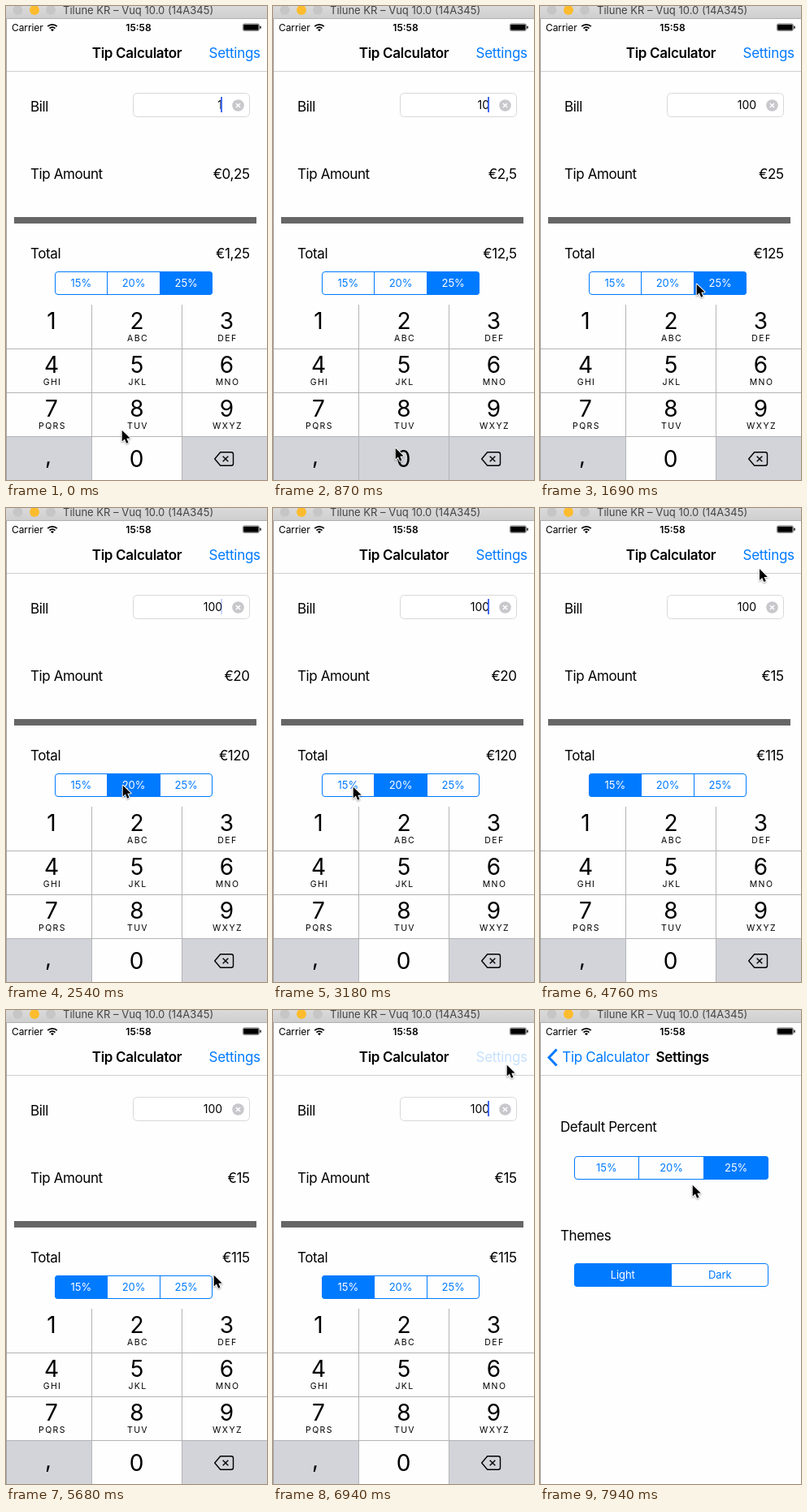
Write an HTML page with a canvas that moves like this. It is 321 by 584 pixels and loops after 8 s.

```html
<!DOCTYPE html>
<html lang="en">
<head>
<meta charset="utf-8">
<title>Tip Calculator</title>
<style>
  html, body { margin: 0; width: 100%; height: 100%; overflow: hidden; background: #fff; }
  canvas { display: block; width: 321px; height: 584px; }
</style>
</head>
<body>
<canvas id="stage" width="321" height="584"></canvas>
<script>
const W = 321, H = 584, LOOP = 8000;
const BLUE = '#007aff', PAPER = '#fefefe', KEY_GRAY = '#d2d4da', LINE = '#b4b4b6';
const FONT = 'Inter, Roboto, sans-serif';
const PUSH_AT = 7395;
const ctx = document.getElementById('stage').getContext('2d');

// Pointer path: time, x, y of the tip
const PATH = [
  [0, 142, 522], [50, 142, 522], [330, 150, 544], [1210, 150, 544],
  [1450, 172, 440], [1690, 192, 342], [1780, 188, 342], [2030, 152, 343],
  [2300, 143, 341], [2600, 143, 341], [2870, 98, 343], [3400, 98, 343],
  [3740, 98, 339], [3890, 158, 260], [4060, 208, 176], [4270, 208, 176],
  [4700, 271, 72], [5120, 241, 150], [5300, 244, 240], [5490, 255, 326],
  [5680, 255, 326], [5800, 250, 210], [5980, 309, 64], [6140, 309, 64],
  [6370, 266, 121], [6570, 287, 67], [7480, 287, 67], [7900, 187, 215], [8000, 187, 215]
];

// Bill, tip and total as they change over time
const STATES = [
  { at: 0, bill: '1', tip: '€0,25', total: '€1,25', pick: 2 },
  { at: 470, bill: '10', tip: '€2,5', total: '€12,5', pick: 2 },
  { at: 980, bill: '100', tip: '€25', total: '€125', pick: 2 },
  { at: 2300, bill: '100', tip: '€20', total: '€120', pick: 1 },
  { at: 3200, bill: '100', tip: '€15', total: '€115', pick: 0 }
];
const PRESSES = [[370, 470], [870, 980]];

const clamp = v => Math.max(0, Math.min(1, v));
const mix = (a, b, p) => a + (b - a) * p;

function slope(i, axis) {
  if (i === 0 || i === PATH.length - 1) return 0;
  const [a, b, c] = [PATH[i - 1], PATH[i], PATH[i + 1]];
  const m = (b[axis] - a[axis]) / (b[0] - a[0]);
  const n = (c[axis] - b[axis]) / (c[0] - b[0]);
  return m * n <= 0 ? 0 : 2 * m * n / (m + n);
}

// Monotone cubic through the path points
function pointer(t) {
  let i = 0;
  while (i < PATH.length - 2 && t >= PATH[i + 1][0]) i++;
  const a = PATH[i], b = PATH[i + 1], span = b[0] - a[0], u = (t - a[0]) / span;
  const ease = u * u * (3 - 2 * u);
  return [1, 2].map(k => mix(a[k], b[k], ease) +
    span * u * (1 - u) * ((1 - u) * slope(i, k) - u * slope(i + 1, k)));
}

function caretAlpha(t) {
  if (t < 1400) return 1;
  const phase = (t - 900) % 1000;
  return phase < 500 ? clamp(phase / 40) : 1 - clamp((phase - 520) / 170);
}

function pushProgress(t) {
  const s = Math.max(0, t - PUSH_AT) / 1000 * 17;
  return 1 - (1 + s) * Math.exp(-s);
}

function text(str, x, y, o = {}) {
  const { size = 17, weight = 400, color = '#000', align = 'left', track = -0.024 * size, alpha = 1 } = o;
  ctx.save();
  ctx.globalAlpha *= alpha;
  ctx.font = `${weight} ${size}px ${FONT}`;
  ctx.letterSpacing = track + 'px';
  ctx.textAlign = align;
  ctx.fillStyle = color;
  // Leave out the spacing after the last letter
  ctx.fillText(str, align === 'right' ? x + track : x, y);
  ctx.restore();
}

function rect(x, y, w, h, color) {
  ctx.fillStyle = color;
  ctx.fillRect(x, y, w, h);
}

function disc(x, y, r, color) {
  ctx.fillStyle = color;
  ctx.beginPath();
  ctx.arc(x, y, r, 0, 7);
  ctx.fill();
}

function stroke(points, color, width) {
  ctx.strokeStyle = color;
  ctx.lineWidth = width;
  ctx.beginPath();
  points.forEach(([x, y], i) => i ? ctx.lineTo(x, y) : ctx.moveTo(x, y));
  ctx.stroke();
}

function cross(x, y, r, color, width) {
  stroke([[x - r, y - r], [x + r, y + r]], color, width);
  stroke([[x + r, y - r], [x - r, y + r]], color, width);
}

function segments(x, y, w, labels, pick) {
  const h = 29, part = w / labels.length;
  const edge = i => Math.floor(x + i * part);
  ctx.save();
  ctx.beginPath();
  ctx.roundRect(x, y, w, h, 4);
  ctx.clip();
  rect(edge(pick), y, edge(pick + 1) + 1 - edge(pick), h, BLUE);
  for (let i = 1; i < labels.length; i++) rect(edge(i), y, 1, h, BLUE);
  ctx.restore();
  ctx.strokeStyle = BLUE;
  ctx.lineWidth = 1;
  ctx.beginPath();
  ctx.roundRect(x + 0.5, y + 0.5, w - 1, h - 1, 3.5);
  ctx.stroke();
  labels.forEach((label, i) => text(label, x + (i + 0.5) * part, y + 19,
    { size: 13, align: 'center', track: -0.1, color: i === pick ? '#fff' : BLUE }));
}

function calculator(t) {
  const s = STATES.filter(state => t >= state.at).pop();
  rect(0, 81, W, H, PAPER);
  text('Bill', 30, 130);
  ctx.beginPath();
  ctx.roundRect(156.5, 107.5, 143, 29, 5);
  ctx.fillStyle = '#fff';
  ctx.fill();
  ctx.strokeStyle = '#d8d8d8';
  ctx.lineWidth = 1;
  ctx.stroke();
  text(s.bill, 266, 127, { size: 14, align: 'right', track: -0.1 });
  ctx.save();
  ctx.globalAlpha *= caretAlpha(t);
  rect(264, 112, 2, 19, '#426bf2');
  ctx.restore();
  disc(285.5, 122.5, 7.3, '#c8c8cc');
  cross(285.5, 122.5, 2.6, '#fff', 1.4);

  text('Tip Amount', 30, 213);
  text(s.tip, 300, 213, { align: 'right' });
  rect(10, 260, 298, 8, '#666');
  text('Total', 30, 311);
  text(s.total, 300, 311, { align: 'right' });
  segments(60, 327, 194, ['15%', '20%', '25%'], s.pick);
}

function keyboard(t) {
  const cols = [56, 161, 271.5];
  const letters = ['', 'ABC', 'DEF', 'GHI', 'JKL', 'MNO', 'PQRS', 'TUV', 'WXYZ'];
  rect(0, 368, W, 216, PAPER);
  rect(0, 531, 105, 53, KEY_GRAY);
  rect(217, 531, 104, 53, KEY_GRAY);
  if (PRESSES.some(([down, up]) => t >= down && t < up)) rect(106, 531, 110, 53, KEY_GRAY);
  [422, 476, 530].forEach(y => rect(0, y, W, 1, LINE));
  [105, 216].forEach(x => rect(x, 368, 1, 216, LINE));
  const digit = { size: 28, align: 'center', track: 0 };
  letters.forEach((label, i) => {
    const x = cols[i % 3], y = 398 + 54 * Math.floor(i / 3);
    text(i + 1, x, y, digit);
    text(label, x + 1, y + 15, { size: 10.5, align: 'center', track: 1.4 });
  });
  text('0', 160.5, 568, digit);
  text(',', 52, 564, digit);

  ctx.lineJoin = 'round';
  ctx.strokeStyle = '#000';
  ctx.lineWidth = 1.4;
  ctx.beginPath();
  ctx.moveTo(256.7, 558);
  ctx.lineTo(263.7, 549.7);
  ctx.arcTo(279.5, 549.7, 279.5, 552, 2.5);
  ctx.arcTo(279.5, 566.3, 277, 566.3, 2.5);
  ctx.lineTo(263.7, 566.3);
  ctx.closePath();
  ctx.stroke();
  cross(270, 558, 3.3, '#000', 1.4);
}

function settings() {
  rect(0, 81, W, H, PAPER);
  text('Default Percent', 25, 150);
  segments(42, 180, 239, ['15%', '20%', '25%'], 2);
  text('Themes', 25, 284);
  segments(42, 312, 239, ['Light', 'Dark'], 0);
}

function navBar(t, p) {
  rect(0, 36, W, 44, PAPER);
  rect(0, 80, W, 1, '#cfcfd1');
  const title = { weight: 600, align: 'center', track: -0.3 };
  const link = { color: BLUE, track: -0.3 };
  const label = mix(161, 81, p);
  text('Tip Calculator', label, 64, { ...title, alpha: clamp(1 - p * 1.6) });
  text('Settings', 313, 64,
    { ...link, align: 'right', alpha: (t < 6860 ? 1 : 0.22) * clamp(1 - p * 2) });
  if (p <= 0) return;
  const arrival = clamp(p * 1.6 - 0.6);
  text('Tip Calculator', label, 64, { ...link, align: 'center', alpha: arrival });
  text('Settings', mix(340, 175, p), 64, { ...title, alpha: clamp(p * 1.4) });
  ctx.save();
  ctx.globalAlpha = arrival;
  ctx.lineJoin = 'miter';
  stroke([[20.5, 48.5], [11, 58.5], [20.5, 68.5]], BLUE, 3);
  ctx.restore();
}

function statusBar() {
  rect(0, 16, W, 20, PAPER);
  text('Carrier', 7, 31, { size: 12, track: -0.1 });
  text('15:58', 163, 31, { size: 12, weight: 600, align: 'center', track: 0 });
  ctx.strokeStyle = '#000';
  ctx.lineWidth = 1.7;
  [4.9, 8.2].forEach(r => {
    ctx.beginPath();
    ctx.arc(57, 31, r, -Math.PI * 0.75, -Math.PI * 0.25);
    ctx.stroke();
  });
  ctx.fillStyle = '#000';
  ctx.beginPath();
  ctx.moveTo(57, 31.3);
  ctx.arc(57, 31, 2.6, -Math.PI * 0.78, -Math.PI * 0.22);
  ctx.fill();
  ctx.lineWidth = 0.5;
  ctx.beginPath();
  ctx.roundRect(291.4, 21.9, 20, 8.7, 2);
  ctx.stroke();
  ctx.beginPath();
  ctx.roundRect(292.2, 22.7, 18.4, 7.1, 1);
  ctx.roundRect(312.3, 24.5, 1.4, 3.5, 0.7);
  ctx.fill();
}

function windowFrame() {
  const shade = ctx.createLinearGradient(0, 0, 0, 16);
  shade.addColorStop(0, '#dadada');
  shade.addColorStop(1, '#cecece');
  rect(0, 0, W, 16, shade);
  rect(0, 15, W, 1, '#b0b0b0');
  disc(14.5, 5, 6, '#c6c6c6');
  disc(35, 5, 6, '#fdbc2e');
  disc(55, 5, 6, '#c6c6c6');
  text('Tilune KR – Vuq 10.0 (14A345)', 70, 10, { size: 13, color: '#444', track: 0 });
  rect(0, 16, 1, H, '#a4a4a4');
}

function arrow([x, y]) {
  const shape = [[0, 0], [0, 13.8], [3.2, 10.9], [5.4, 16], [7.8, 15], [5.6, 10], [9.9, 9.8]];
  ctx.save();
  ctx.translate(x + 0.7, y + 0.7);
  ctx.beginPath();
  shape.forEach(point => ctx.lineTo(...point));
  ctx.closePath();
  ctx.lineJoin = 'round';
  ctx.lineWidth = 2;
  ctx.strokeStyle = '#fff';
  ctx.shadowColor = 'rgba(0,0,0,.35)';
  ctx.shadowBlur = 2;
  ctx.shadowOffsetY = 1;
  ctx.stroke();
  ctx.shadowColor = 'transparent';
  ctx.fillStyle = '#000';
  ctx.fill();
  ctx.restore();
}

function shifted(dx, paint) {
  ctx.save();
  ctx.translate(dx, 0);
  paint();
  ctx.restore();
}

function draw(t) {
  const p = pushProgress(t);
  rect(0, 0, W, H, PAPER);
  shifted(-W * 0.3 * p, () => calculator(t));
  if (p > 0) {
    rect(0, 81, W, H, `rgba(0,0,0,${0.1 * p})`);
    shifted(Math.round(W * (1 - p)), settings);
  }
  if (p < 0.995) shifted(-Math.round(W * p), () => keyboard(t));
  navBar(t, p);
  statusBar();
  windowFrame();
  arrow(pointer(t));
}

const start = performance.now();
function tick() {
  draw((performance.now() - start) % LOOP);
  requestAnimationFrame(tick);
}
tick();
</script>
</body>
</html>
```
